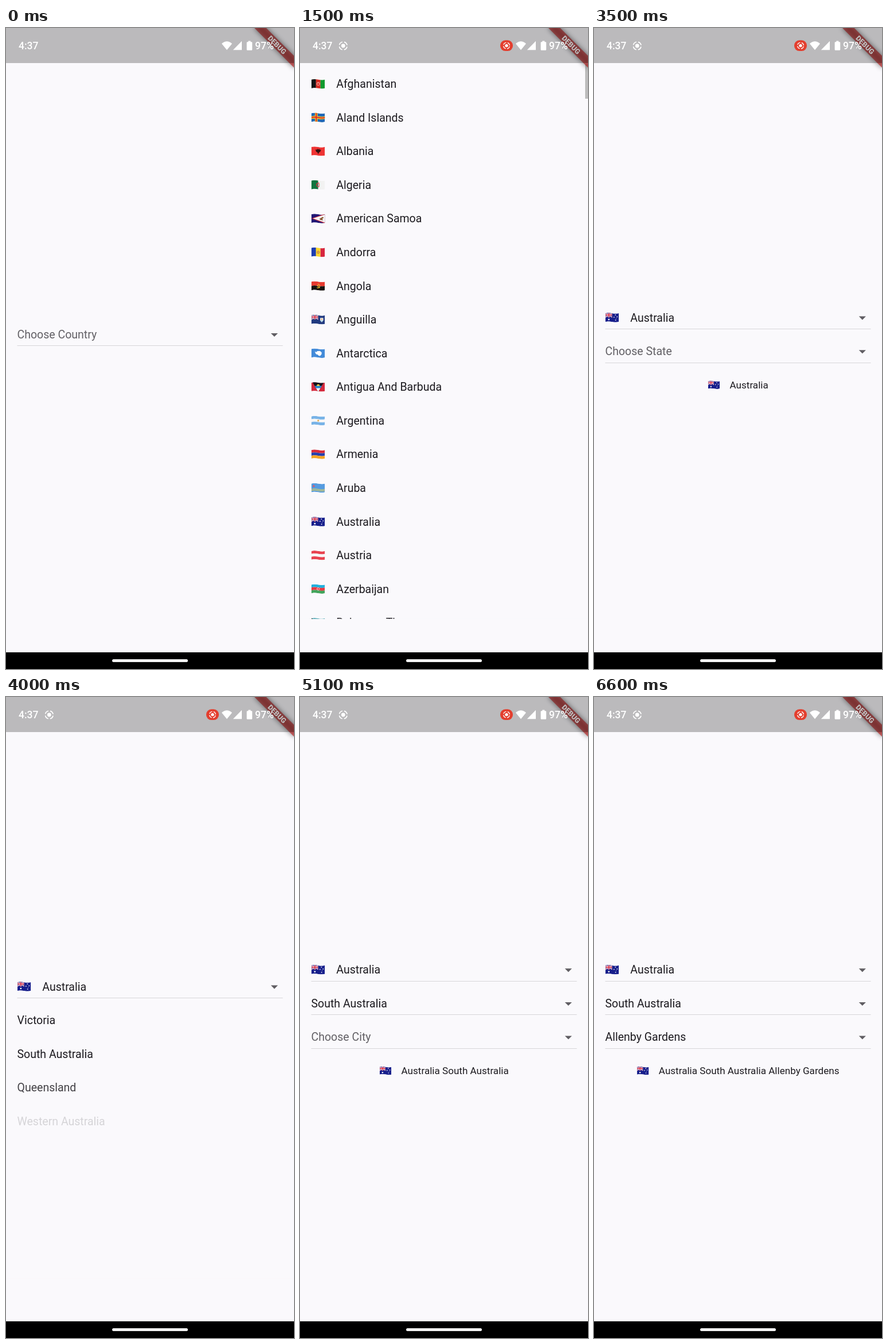
An HTML page for the animation above (6700 ms loop, 502 by 1115 pixels).

```html
<!DOCTYPE html>
<html lang="en">
<head>
<meta charset="utf-8">
<title>Country picker</title>
<style>
html, body { margin: 0; width: 100%; height: 100%; overflow: hidden; background: #faf9fc; }
svg { display: block; width: 100vw; height: 100vh; font-family: Roboto, sans-serif; }
</style>
</head>
<body>
<svg viewBox="0 0 502 1115">
  <defs id="defs">
    <filter id="soft" x="-30%" y="-150%" width="160%" height="400%"><feGaussianBlur stdDeviation="4.6"/></filter>
    <g id="rec">
      <circle r="6.9" fill="none" stroke="#fff" stroke-width="1.7" stroke-dasharray="7.8 3.04" stroke-dashoffset="-1.5"/>
      <circle r="3.4" fill="#fff"/>
    </g>
  </defs>
  <rect width="502" height="1115" fill="#faf9fc"/>
  <g id="page"></g>
  <g id="menu"></g>
  <g transform="translate(502 0) rotate(45)">
    <rect x="-48.8" y="34.2" width="97.6" height="14.6" opacity=".5" filter="url(#soft)"/>
    <rect x="-48.8" y="34.2" width="97.6" height="14.6" fill="#b71c1c" fill-opacity=".627"/>
    <text y="45.9" text-anchor="middle" font-size="12.4" font-weight="900" fill="#fff">DEBUG</text>
  </g>
  <rect width="502" height="61" fill="#000" fill-opacity=".255"/>
  <g fill="#fff">
    <g font-size="17.5" font-weight="500">
      <text x="22" y="37">4:37</text>
      <text x="434" y="37">97%</text>
    </g>
    <path d="M376 27.2Q385 19.2 394 27.2L385 38.3Z"/>
    <path d="M411 22.8V38.3H395.8Z"/>
    <path d="M422.3 24.2V22.6H426.4V24.2H428Q429.2 24.2 429.2 25.4V37.6Q429.2 38.8 428 38.8H420.8Q419.6 38.8 419.6 37.6V25.4Q419.6 24.2 420.8 24.2Z"/>
  </g>
  <g id="recording">
    <use href="#rec" x="75.3" y="31"/>
    <rect x="349" y="21.3" width="22" height="18.8" rx="9" fill="#e33e2e"/>
    <use href="#rec" transform="translate(360 30.7) scale(.78)"/>
  </g>
  <rect y="1086" width="502" height="29"/>
  <rect x="185" y="1098" width="132" height="5" rx="2.5" fill="#f4f4f4"/>
</svg>
<script>
const LOOP = 6700, STEP = 100, ROW = 58.57, PAD = 9.76, MID = 533.3;
const INK = '#1d1b20', HINT = '#626065';
const $ = id => document.getElementById(id);
const clamp = v => Math.max(0, Math.min(1, v));
const mix = (a, b, k) => a + (b - a) * k;

// ---- flags, drawn on a waving 24 x 15 cloth ----
const band = (y, h, fill) => {
  const b = y + h;
  return `<path d="M0 ${y}C8 ${y - 2.4} 16 ${y + 2.4} 24 ${y}V${b}C16 ${b + 2.4} 8 ${b - 2.4} 0 ${b}Z" fill="${fill}"/>`;
};
const bands = (...cols) => cols.map((c, i) => band(i * 15 / cols.length, 15 / cols.length, c)).join('');
const box = (x, y, w, h, fill) => `<rect x="${x}" y="${y}" width="${w}" height="${h}" fill="${fill}"/>`;
const bars = (...cols) => cols.map((c, i) => box(i * 24 / cols.length, -2, 24 / cols.length, 20, c)).join('');
const dot = (x, y, r, fill) => `<circle cx="${x}" cy="${y}" r="${r}" fill="${fill}"/>`;
const shape = (d, fill) => `<path d="${d}" fill="${fill}"/>`;
const line = (d, col, w) => `<path d="${d}" fill="none" stroke="${col}" stroke-width="${w}"/>`;
const cross = (col, w) => line('M8.5 -2V17', col, w) + band(7.5 - w / 2, w, col);
const jack = col => box(0, -2, 12, 9.3, col) +
  line('M0 -.5L12 7M12 -.5L0 7', '#fff', 1.7) + line('M0 -.5L12 7M12 -.5L0 7', '#d8243c', .7) +
  line('M6 -2V7.3M0 3.1H12', '#fff', 2.7) + line('M6 -2V7.3M0 3.1H12', '#d8243c', 1.5);

const flags = {
  'Afghanistan': bars('#151515', '#d62a20', '#0f9a2d') + dot(12, 7.5, 3.1, '#ef8d84') + dot(12, 7.8, 1.6, '#d62a20'),
  'Aland Islands': band(0, 15, '#2169b5') + cross('#fbd01f', 4.6) + cross('#d8272f', 2),
  'Albania': band(0, 15, '#ee3434') + shape('M12 4.8L13.5 3L14.4 5L17 4.6L15.7 8.4L13.5 9.5L12 12.6L10.5 9.5L8.3 8.4L7 4.6L9.6 5L10.5 3Z', '#35100f'),
  'Algeria': bars('#11743f', '#f2f2f2') + line('M14.2 5.2A3.1 3.1 0 1 0 14.2 9.8', '#d92b3c', 1.2) + dot(13.6, 7.5, 1, '#d92b3c'),
  'American Samoa': band(0, 15, '#211775') + shape('M0 7.2L24 -1V16Z', '#c42b3c') + shape('M2.5 7.3L24 .6V14.6Z', '#f5f5f5') + shape('M14 8L20 4.5L22 6L19 8L21 10.5L16 10Z', '#8a5a35'),
  'Andorra': bars('#1d3db0', '#f8d430', '#d8263f') + dot(12, 7.5, 2.6, '#c98a3d') + dot(12, 7.5, 1.3, '#e7b34b'),
  'Angola': bands('#e63a30', '#17120f') + line('M11 4.4A3.3 3.3 0 1 1 9.6 10.4M10 7L15 11', '#f3c52d', 1.1) + dot(11.4, 6.9, .9, '#f3c52d'),
  'Anguilla': band(0, 15, '#213a80') + jack('#213a80') + shape('M15.5 4.5H21V8.5Q20.5 11 18.2 12Q16 11 15.5 8.5Z', '#f1f1f1') + dot(18.2, 7, 1.1, '#e7a04b') + box(16.2, 9.3, 4, 1.2, '#74bdd8'),
  'Antarctica': band(0, 15, '#438bd9') + shape('M6.2 4L8.2 5.8L10.5 3.6L15 3.4L18.2 6.2L17.8 9.4L15.2 12.1L12.7 11.7L11.4 9.9L8.4 9.3L6.8 7Z', '#fff'),
  'Antigua And Barbuda': band(0, 15, '#d52a3e') + shape('M1 -2H23L12 16Z', '#16131c') + dot(12, 5.5, 2.7, '#f8d13a') + shape('M5.4 5.6H18.6L15.9 10H8.1Z', '#2588d1') + shape('M8.1 9.7H15.9L12 16Z', '#fff'),
  'Argentina': bands('#78b3e7', '#f6f6f6', '#78b3e7') + dot(12, 7.5, 1.6, '#e4ae55'),
  'Armenia': bands('#d82c3b', '#2540ad', '#f4a423'),
  'Aruba': band(0, 15, '#559be0') + band(9.5, 1, '#f1d64b') + band(11.6, 1, '#f1d64b') + shape('M4 1.7L5 3.4L6.7 4.3L5 5.2L4 6.9L3 5.2L1.3 4.3L3 3.4Z', '#d6596a'),
  'Australia': band(0, 15, '#171f8c') + jack('#171f8c') + [[6, 11, 1.4], [17.7, 3, .9], [15.2, 7, .9], [20.8, 6.2, .9], [18, 12, .9], [19.2, 8.8, .5]].map(s => dot(...s, '#fff')).join(''),
  'Austria': bands('#e84350', '#f7f7f7', '#e84350'),
  'Azerbaijan': bands('#21b1dd', '#e83a43', '#42a45b') + line('M13 5.9A2 2 0 1 0 13 9.1', '#fff', .9) + dot(14, 7.5, .8, '#fff'),
  'Bahamas The': bands('#168c9b', '#f5c83e', '#168c9b') + shape('M0 -1L10 7.5L0 16Z', '#17191b')
};
$('defs').innerHTML += '<clipPath id="cloth"><path d="M0 0C8 -2.4 16 2.4 24 0V15C16 17.4 8 12.6 0 15Z"/></clipPath>' +
  Object.entries(flags).map(([name, art]) => `<g id="${flagId(name)}" clip-path="url(#cloth)">${art}</g>`).join('');

function flagId(name) { return 'flag-' + name.replace(/ /g, '-'); }
const flag = (name, x, c, k = 1) =>
  `<use href="#${flagId(name)}" transform="translate(${x} ${c - 7.9 * k}) scale(${.98 * k} ${k})"/>`;
const text = (str, x, y, size = 19.52, fill = INK) =>
  `<text x="${x}" y="${y}" font-size="${size}" fill="${fill}">${str}</text>`;
const label = (str, c, fill) => flags[str]
  ? flag(str, 20, c) + text(str, 63.3, c + 6.6, 19.52, fill)
  : text(str, 19.5, c + 6.6, 19.52, fill);

// ---- menus ----
const states = ['Victoria', 'South Australia', 'Queensland', 'Western Australia', 'Australian Capital Territory',
  'Tasmania', 'New South Wales', 'Northern Territory'];
const cities = ['Aberfoyle Park', 'Adelaide', 'Adelaide city centre', 'Adelaide Hills', 'Albert Park', 'Alberton',
  'Aldgate', 'Aldinga Beach', 'Alexandrina', 'Allenby Gardens', 'Anangu Pitjantjatjara', 'Andrews Farm',
  'Angaston', 'Angle Vale', 'Ardrossan', 'Ascot Park', 'Athelstone'];
const full = { top: ROW, bottom: 1027.7 };
const menus = [
  { items: Object.keys(flags), count: 250, open: 530, close: 3270, button: MID, bar: 700, ...full },
  { items: states, count: 8, open: 3783, close: 4970, button: MID + ROW / 2, top: 523.5, bottom: 1011.6 },
  { items: cities, count: 600, open: 5683, close: 6470, button: MID + ROW, bar: 5683, ...full }
];

function drawMenu(m, t) {
  const p = clamp((t - m.open) / 300);
  const fade = t < m.close ? clamp(p / .25) : clamp(1 - (t - m.close) / 75);
  if (!fade) return '';
  const grow = clamp((p - .25) / .25), unit = .5 / (m.count + 1.5);
  const top = mix(m.button - ROW / 2, m.top, grow), bottom = mix(m.button + ROW / 2, m.bottom, grow);
  const bg = Math.ceil(top);
  const items = m.items.map((name, i) => {
    const alpha = clamp((p - .5 - (i + 1) * unit) / (1.5 * unit));
    return alpha ? `<g opacity="${alpha}">${label(name, m.top + PAD + ROW * (i + .5))}</g>` : '';
  }).join('');
  const bar = m.bar ? `<rect x="497" y="63" width="5" height="60" fill="#bcbcbc" opacity="${clamp((t - m.bar) / 300)}"/>` : '';
  return `<clipPath id="sheet"><rect y="${top}" width="502" height="${bottom - top}"/></clipPath>
    <g opacity="${fade}"><rect y="${bg}" width="502" height="${bottom - bg}" fill="#faf9fc"/>
    <g clip-path="url(#sheet)">${items}</g>${bar}</g>`;
}

// ---- form ----
function field(value, hint, c) {
  return label(value || hint, c, value ? INK : HINT) +
    `<rect x="19.5" y="${Math.round(c + 19)}" width="463" height="1" fill="#d7d6d9"/>` +
    `<path d="M461.7 ${c - 2.4}h12.2l-6.1 6.1z" fill="#605e63"/>`;
}

const pen = document.createElement('canvas').getContext('2d');
function summary(str, c) {
  pen.font = '17.08px Roboto, sans-serif';
  const x = 251 - (38.3 + pen.measureText(str).width) / 2;
  return flag('Australia', x + .5, c, .875) + text(str, x + 38.3, c + 5.7, 17.08);
}

function drawPage(t) {
  const picks = [[3300, 'Australia'], [5000, 'South Australia'], [6500, 'Allenby Gardens']]
    .filter(([at]) => t >= at).map(([, name]) => name);
  const hints = ['Choose Country', 'Choose State', 'Choose City'].slice(0, picks.length + 1);
  const first = MID - (hints.length - 1) * ROW / 2;
  return hints.map((h, i) => field(picks[i], h, first + i * ROW)).join('') +
    (picks.length ? summary(picks.join(' '), first + hints.length * ROW) : '');
}

function draw(t) {
  $('page').innerHTML = drawPage(t);
  $('menu').innerHTML = menus.map(m => drawMenu(m, t)).join('');
  $('recording').setAttribute('opacity', clamp(t / 300));
}

let last = -1;
function tick() {
  const t = Math.floor(performance.now() % LOOP / STEP) * STEP;
  if (t !== last) draw(last = t);
  requestAnimationFrame(tick);
}
tick();
</script>
</body>
</html>
```
